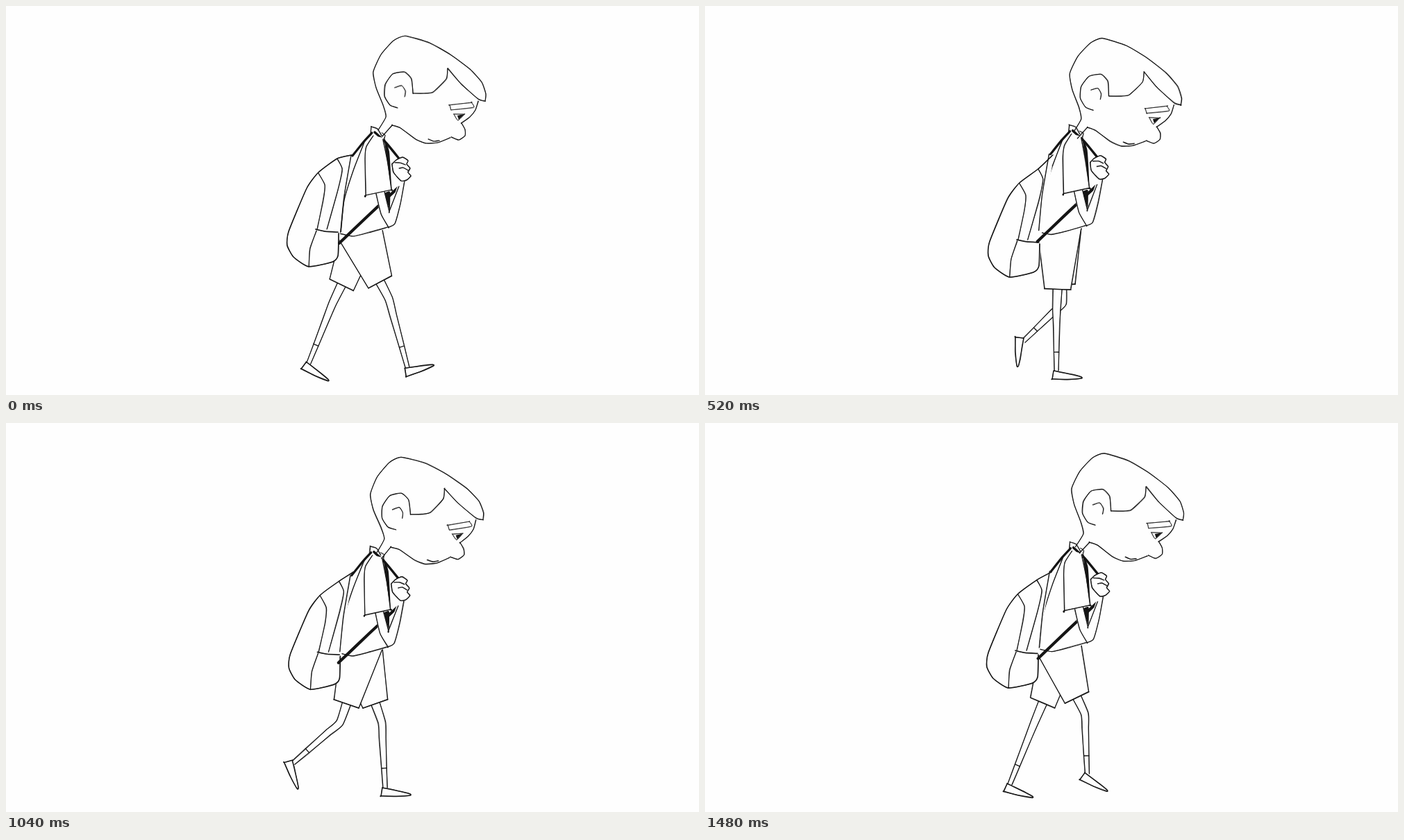
Write an HTML page with a canvas that moves like this. It is 998 px wide and 561 px high and loops after 1560 ms.

```html
<!DOCTYPE html>
<html lang="en">
<head>
<meta charset="utf-8">
<title>Walking boy</title>
<style>
  html, body { margin: 0; width: 100%; height: 100%; overflow: hidden; background: #fefefe; }
  canvas { display: block; }
</style>
</head>
<body>
<canvas width="998" height="561"></canvas>
<script>
const ctx = document.querySelector("canvas").getContext("2d");
const INK = "#151515", PAPER = "#fefefe";
const TICK = 40, DRAWINGS = 20, STEP = 10;
const { sin, cos, hypot, max, sqrt, PI } = Math;

// Drawings last two ticks; each step starts with a longer hold, a few are short.
const ticks = i => i % STEP === 0 ? 3 : [4, 12, 16].includes(i) ? 1 : 2;
const starts = [0];
for (let i = 0; i < DRAWINGS; i++) starts.push(starts[i] + ticks(i) * TICK);
const LOOP = starts[DRAWINGS];

// Ankle path: phase, x, y, foot angle
const ankleKeys = [
  [0, 578, 521, -20], [3, 546, 526, 0], [6, 506, 526, 0], [9, 439, 521, 14],
  [10, 436, 515, 26], [13, 414, 490, 65], [16, 459, 483, 88], [18, 523, 491, 70],
  [20, 578, 521, -20]
];
const HIP = [511, 345], THIGH = 92;

const points = text => text.split(" ").map(p => p.split(",").map(Number));
const mix = (a, b, u) => a.map((v, i) => v + (b[i] - v) * u);
const normal = (a, b) => {
  const d = hypot(b[0] - a[0], b[1] - a[1]);
  return [(b[1] - a[1]) / d, (a[0] - b[0]) / d];
};
const offset = (p, n, w) => [p[0] + n[0] * w, p[1] + n[1] * w];

function ankleAt(phase) {
  const i = max(1, ankleKeys.findIndex(key => key[0] >= phase));
  const [a, b] = [ankleKeys[i - 1], ankleKeys[i]];
  return mix(a, b, (phase - a[0]) / (b[0] - a[0])).slice(1);
}

// The knee swings on an arc below the hip and lifts as the leg comes forward.
function kneeAt(phase) {
  const x = 41 * cos(phase * PI / STEP - 0.2);
  const lift = 14 * max(0, cos((phase - 17.7) * PI / STEP)) ** 3;
  return [HIP[0] + x, HIP[1] + sqrt(THIGH ** 2 - x * x) - lift];
}

// Soft curve through the points; a doubled point makes a corner.
function trace(pts) {
  ctx.beginPath();
  ctx.moveTo(...pts[0]);
  for (let i = 0; i < pts.length - 1; i++) {
    const a = pts[i], b = pts[i + 1], before = pts[i - 1] || a, after = pts[i + 2] || b;
    ctx.bezierCurveTo(
      a[0] + (b[0] - before[0]) / 11, a[1] + (b[1] - before[1]) / 11,
      b[0] - (after[0] - a[0]) / 11, b[1] - (after[1] - a[1]) / 11, ...b);
  }
}

let drawing = 0;

// A pen line with a thin second line that wobbles from drawing to drawing.
function line(shape, width = 1.2) {
  const pts = typeof shape === "string" ? points(shape) : shape;
  const wobble = n => sin(drawing * 12.9 + n * 78.2) * 0.7;
  ctx.lineWidth = width;
  trace(pts);
  ctx.stroke();
  ctx.lineWidth = 0.6;
  trace(pts.map(([x, y], i) => [x + wobble(i + x), y + wobble(i + y)]));
  ctx.stroke();
}

function fill(shape, color = PAPER) {
  trace(typeof shape === "string" ? points(shape) : shape);
  ctx.fillStyle = color;
  ctx.fill();
}

function shape(outline, width) {
  fill(outline);
  line(outline, width);
}

function moved(x, y, draw) {
  ctx.save();
  ctx.translate(x, y);
  draw();
  ctx.restore();
}

function leg(phase) {
  const knee = kneeAt(phase), [x, y, turn] = ankleAt(phase), ankle = [x, y];
  const thigh = normal(HIP, knee), calf = normal(knee, ankle);
  const side = s => [
    offset(mix(HIP, knee, 0.55), thigh, 6.8 * s),
    offset(knee, mix(thigh, calf, 0.5), 5.6 * s),
    offset(mix(knee, ankle, 0.25), calf, 4.8 * s),
    offset(mix(knee, ankle, 0.7), calf, 3.7 * s),
    offset(ankle, calf, 3 * s)
  ];
  const back = side(-1), front = side(1);
  fill([...back, ...front.slice().reverse()]);
  line(back);
  line(front);
  line([back[3], front[3]]);
  moved(x, y, () => {
    ctx.rotate(turn * PI / 180);
    shape("-4,0 -6,12 -6,12 16,12.5 36,11 36,9 25,6 6,2 -4,0", 1.5);
  });
}

// The hem lies across the thigh.
function trouser(phase, drop, near) {
  const knee = kneeAt(phase), across = normal(HIP, knee), middle = mix(HIP, knee, 0.69);
  const back = [480, 338 + drop], front = [542, 322 + drop];
  const hemBack = offset(middle, across, -19), hemFront = offset(middle, across, 19);
  fill([back, hemBack, hemBack, hemFront, hemFront, front]);
  line([back, hemBack]);
  line([hemBack, hemFront], 1.5);
  line([mix(front, hemFront, near && hemFront[0] < 508 ? 0.5 : 0), hemFront]);
}

function bag(sag) {
  fill("497,216 477,220 450,240 433,263 407,325 405,345 414,362 436,376 470,369 479,362 481,325 486,275");
  line([[498, 215 - sag], [477, 220], [450, 240], [433, 263], [407, 325], [405, 345],
    [414, 362], [436, 376], [470, 369], [478, 360], [479, 328]], 1.5);
  line("450,241 459,258 457,280 448,322");
  line("477,220 484,235 478,265 462,322");
  line("446,322 460,325 478,326", 1.5);
  line("447,324 438,350 436,376");
}

function torso() {
  fill("530,182 517,196 500,235 486,282 482,330 500,332 550,319 553,262 545,190");
  line("517,194 501,235 487,280 482,326");
  line("481,328 500,332 522,327 550,319");
}

function armAndStraps() {
  line("527,183 515,196 499,216", 3.2);
  line("531,182 548,198 566,220", 3.4);
  fill("544,188 552,210 555,264 550,262 549,225", INK);
  line("569,258 524,300 480,342", 4.2);
  fill("545,270 553,268 553,296", INK);
  fill("532,270 540,302 552,320 560,315 568,285 575,250 566,254 552,296 552,296 545,267");
  line("533,270 540,300 551,319 551,319 560,314 568,285 574,253");
  line("545,268 552,296 552,296 566,260");
  fill("529,187 517,215 518,274 518,274 555,265 555,265 549,225 543,190");
  line("529,187 519,203 517,220 518,273 518,273 555,265 555,265 550,228 543,192");
  shape("556,228 562,222 571,218 579,223 577,228 582,234 579,240 583,245 577,251 569,252 558,240 556,228", 1.4);
  line("560,226 568,226 575,229");
  line("566,234 572,233 579,237");
  line("525,184 526,174 526,174 535,177 541,187");
  line("541,183 546,186 545,191", 1);
}

function head() {
  line("536,179 547,160 543,143 533,118 529,95 540,70 558,50 575,43 610,53 640,70 668,91 685,110 691,127 690,137 690,137 680,134 655,112 636,90");
  line("636,90 634,105 615,124 602,126 586,126");
  line("586,126 584,105 574,95 557,98 546,113 545,130 553,143 564,147");
  line("560,118 570,115 575,123 574,131", 1);
  line("680,137 676,150 668,160 656,169 656,169 661,178 661,187 652,193 641,189");
  line("542,188 556,172 556,172 568,176 590,192 605,198 622,197 640,190");
  line("608,192 616,195 624,194");
  line("641,150 639,143 639,143 670,139 670,139 673,146 641,150", 0.8);
  line("645,156 660,156 660,156 651,165 645,156", 0.8);
  fill("650,158 660,156 660,156 652,164", INK);
}

function render() {
  const time = performance.now() % LOOP;
  drawing = starts.filter(s => s <= time).length - 1;
  const farPhase = (drawing + STEP) % DRAWINGS;

  // The weight drops early in each step, the bag follows late.
  const step = drawing % STEP / STEP;
  const arch = sin(PI * step), sway = sin(2 * PI * step);
  const dip = 5.5 * sin(PI * step ** 0.6), sag = 15 * sin(PI * step ** 1.4);
  const bodyX = -1.5 * arch, bodyY = 4 * sway;

  ctx.fillStyle = PAPER;
  ctx.fillRect(0, 0, 998, 561);
  ctx.strokeStyle = INK;
  ctx.lineCap = ctx.lineJoin = "round";

  for (const phase of [farPhase, drawing]) {
    leg(phase);
    trouser(phase, bodyY, phase === drawing);
  }
  moved(bodyX, bodyY, torso);
  moved(3 * arch, sag, () => bag(sag));
  moved(bodyX, bodyY, () => {
    line("497,216 487,275 482,326");
    armAndStraps();
  });
  moved(600 - 4.5 * arch, 120 + dip, () => {
    ctx.rotate(-2 * sway * PI / 180);
    ctx.translate(-600, -120);
    head();
  });
  requestAnimationFrame(render);
}
render();
</script>
</body>
</html>
```
